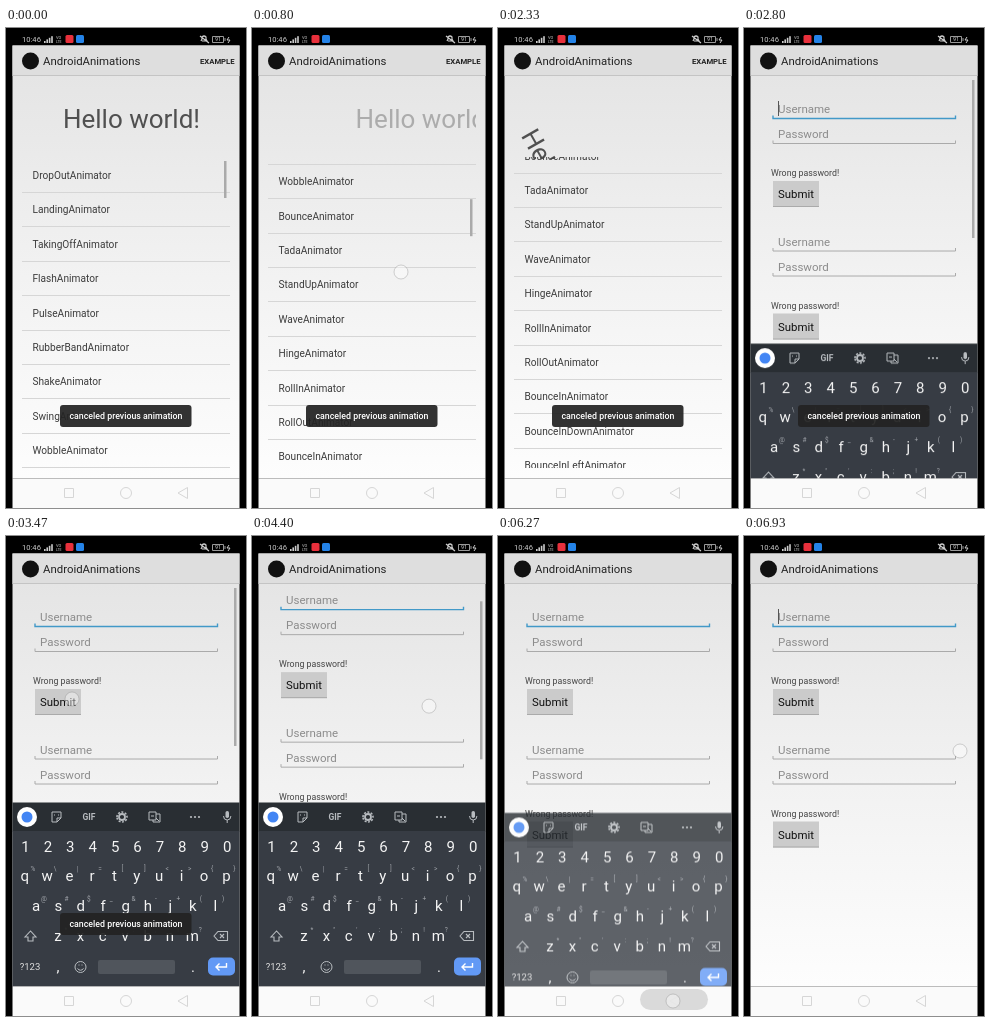
An HTML page with a canvas for the animation above (6990 ms loop, 240 by 480 pixels).

```html
<!DOCTYPE html>
<html lang="en">
<head>
<meta charset="utf-8">
<title>AndroidAnimations</title>
<style>
  html, body { margin: 0; width: 240px; height: 480px; overflow: hidden; background: #000; }
  canvas { display: block; }
</style>
</head>
<body>
<canvas id="stage" width="240" height="480"></canvas>
<script>
const screenCtx = document.getElementById('stage').getContext('2d');
let c = screenCtx;
const LOOP = 6990;
const animators = ('DropOut Landing TakingOff Flash Pulse RubberBand Shake Swing Wobble Bounce Tada ' +
  'StandUp Wave Hinge RollIn RollOut BounceIn BounceInDown BounceInLeft BounceInRight BounceInUp').split(' ');
// start, end, from x, from y, to x, to y
const touches = [
  [70, 260, 149, 380, 149, 240], [740, 810, 149, 244], [810, 1130, 149, 244, 149, 184],
  [1300, 1390, 149, 265], [2130, 2260, 212, 33], [3330, 3540, 66, 163],
  [4270, 4670, 177, 187, 177, 120], [4670, 4860, 177, 120], [5060, 5340, 66, 226],
  [6060, 6330, 175, 465], [6900, 6990, 216, 215]
];

const clamp = v => Math.max(0, Math.min(1, v));
const prog = (t, a, b) => clamp((t - a) / (b - a));
const easeOut = p => 1 - (1 - p) ** 3;
const smooth = p => p * p * (3 - 2 * p);

function keyed(frames, p) {
  const x = p * (frames.length - 1), i = Math.min(Math.floor(x), frames.length - 2);
  return frames[i] + (frames[i + 1] - frames[i]) * (x - i);
}
function rect(x, y, w, h, color) {
  c.fillStyle = color;
  c.fillRect(x, y, w, h);
}
function round(x, y, w, h, r, color) {
  c.fillStyle = color;
  c.beginPath();
  c.roundRect(x, y, w, h, r);
  c.fill();
}
function disc(x, y, r, color) {
  c.fillStyle = color;
  c.beginPath();
  c.arc(x, y, r, 0, 7);
  c.fill();
}
function line(path, color, width = 1) {
  c.strokeStyle = color;
  c.lineWidth = width;
  c.stroke(new Path2D(path));
}
// y is the visual middle of the line
function text(s, x, y, size, color, align = 'left', weight = 400) {
  c.font = `${weight} ${size}px Roboto, sans-serif`;
  c.textAlign = align;
  c.fillStyle = color;
  c.fillText(s, x, y + size * .36);
}
function clipped(x, y, w, h, draw) {
  c.save();
  c.beginPath();
  c.rect(x, y, w, h);
  c.clip();
  draw();
  c.restore();
}

function statusBar() {
  const ink = '#ccc';
  text('10:46', 16, 11.5, 7.6, ink);
  for (let i = 0; i < 4; i++) rect(38 + i * 2.4, 13 - i * 1.6, 1.6, 2 + i * 1.6, ink);
  text('VO', 50, 9.5, 4, ink);
  text('LTE', 50, 13.5, 3.6, ink);
  round(59.5, 7, 8, 8, 1.5, '#e8303c');
  round(70, 7, 8, 8, 1.5, '#2483e8');
  line('M196 13h5l-1-2v-2q-2-2-4 0v2l-1 2M194 8l9 7', ink, 1.2);
  line('M206.5 8.5h11v6h-11zM219 10v3', '#999');
  text('91', 212, 11.5, 5.5, ink, 'center');
  line('M223 9l-2 3h3l-2 3', ink);
}

function page(hasExample) {
  const g = c.createLinearGradient(0, 48, 0, 450);
  g.addColorStop(0, '#e5e5e5');
  g.addColorStop(.5, '#f2f2f2');
  g.addColorStop(1, '#fdfdfd');
  rect(6.5, 17.5, 227, 433, g);
  rect(6.5, 17.5, 227, 30, '#dedede');
  rect(6.5, 47, 227, 1, '#c4c4c4');
  disc(24.5, 33, 8.5, '#111');
  text('AndroidAnimations', 37, 33, 11.4, '#222');
  if (hasExample) text('EXAMPLE', 194, 33, 7.7, '#222', 'left', 700);
}

function hello(t) {
  c.save();
  if (t < 1375) {
    const shift = 46.5 * (t / 800) ** 2;
    c.globalAlpha = clamp(1 - shift / 77);
    c.translate(shift, 0);
  } else {
    const p = prog(t, 1375, 2575);
    c.globalAlpha = keyed([1, 1, 1, 1, 1, 0], p);
    c.translate(33, 74 + keyed([0, 0, 0, 0, 0, 700], p));
    c.rotate(keyed([0, 80, 60, 80, 60, 60], p) * Math.PI / 180);
    c.translate(-33, -74);
  }
  text('Hello world!', 125.5, 90.4, 26, '#505050', 'center');
  c.restore();
}

function listPage(t) {
  page(true);
  const scroll = 269 * easeOut(prog(t, 40, 740)) + 60 * smooth(prog(t, 810, 1130));
  clipped(16, 48, 208, 83, () => hello(t));
  clipped(16, 129, 208, 311, () => {
    animators.forEach((name, i) => {
      const y = 147.4 + i * 34.4 - scroll;
      text(name + 'Animator', 26.5, y, 10.15, '#3c3c3c');
      rect(16, Math.round(y + 16.6), 208, 1, '#d6d6d6');
    });
    c.globalAlpha = 1 - prog(t, 1130, 1400);
    rect(218, 133 + .142 * scroll, 2.5, 37, '#aaa');
  });
}

function field(label, y, color, width) {
  text(label, 34, y, 11.5, '#8c8c8c');
  line(`M29 ${y + 6.5}v3h182.5v-3`, color, width);
}

function form(t, y, start, focused) {
  const p = prog(t, start, start + 700);
  c.save();
  c.translate(120, y + 94);
  c.rotate(keyed([0, -3, -3, 3, -3, 3, -3, 3, -3, 0], p) * Math.PI / 180);
  const k = keyed([1, .9, .9, 1.1, 1.1, 1.1, 1.1, 1.1, 1.1, 1], p);
  c.scale(k, k);
  c.translate(-120, -94);
  if (focused) field('Username', 81, '#4299c8', 1.4);
  else field('Username', 81, '#aaa', 1);
  field('Password', 106, '#aaa', 1);
  if (focused && (t + 900) % 1000 >= 500) rect(34, 73, 1, 15, '#555');
  c.restore();
  text('Wrong password!', 27, y + 145, 8.8, '#444');
  rect(29, y + 153, 46, 26, '#cbcbcb');
  rect(29, y + 178, 46, 1, '#aaa');
  text('Submit', 52, y + 166, 11.4, '#111', 'center');
}

function examplePage(t) {
  page(false);
  const scroll = t < 6060 ? 67 * smooth(prog(t, 4270, 4670)) : 0;
  clipped(6, 48, 228, 402, () => {
    form(t, -scroll, 3550, true);
    form(t, 132.5 - scroll, 5235, false);
    if (t < 6060) rect(228, 52 + .79 * scroll, 2.5, 158, '#aaa');
  });
}

function keyRow(keys, hints, x, y) {
  [...keys].forEach((k, i) => {
    text(k, x + i * 22.4, y, 15, '#f4f4f4', 'center');
    if (hints) text(hints[i], x + 8 + i * 22.4, y - 6.5, 6.5, '#a0a4aa', 'center');
  });
}

function keyboard() {
  const ink = '#b8bcc0';
  rect(6.5, 266.5, 227, 29, '#292e33');
  rect(6.5, 295, 227, 155.5, '#373c44');
  disc(21, 281, 10, '#fff');
  disc(21, 281, 5.5, '#4285f4');
  line('M46 276h9v6l-4 4h-5zM55 282h-4v4M48 279h1M52 279h1', ink);
  text('GIF', 83, 281, 8.5, ink, 'center', 700);
  c.setLineDash([2, 1.5]);
  line('M111 281a5 5 0 0 1 10 0a5 5 0 0 1-10 0', ink, 1.6);
  c.setLineDash([]);
  line('M113 281a3 3 0 0 1 6 0a3 3 0 0 1-6 0', ink, 1.8);
  line('M143 276h7v8h-7zM150 278h4v8h-7v-2M145 280h3M150 282l3 3', ink);
  for (const x of [185, 189, 193]) disc(x, 281, 1.1, ink);
  round(219.5, 275, 3.5, 7, 1.7, ink);
  line('M217.5 280q0 4 3.7 4t3.7-4M221.2 284v3', ink);

  keyRow('1234567890', '', 19.5, 311);
  keyRow('qwertyuiop', '%\\|=[]<>{}', 18.8, 339.3);
  keyRow('asdfghjkl', '@#$_&-+()', 30, 369.5);
  keyRow('zxcvbnm', '*"\':;!?', 52, 400);
  line('M24.5 395l-5.5 6h3v4h5v-4h3z', ink, 1.1);
  line('M208 400l4-4.5h9.5v9h-9.5zM214 398l4 4M218 398l-4 4', ink, 1.1);
  text('?123', 24, 431, 9.5, '#e0e0e0', 'center');
  text(',', 52, 431, 15, '#f4f4f4', 'center');
  line('M69 431a5.5 5.5 0 0 1 11 0a5.5 5.5 0 0 1-11 0M71.5 432.5q3 3.5 6 0M72.5 429h1M75.5 429h1', ink);
  round(92, 424, 77, 14, 2, '#50555c');
  text('.', 187, 431, 15, '#f4f4f4', 'center');
  round(202, 421.5, 27, 18, 5, '#6299f5');
  line('M220.5 427v4h-10M213.5 427.5l-3.5 3.5l3.5 3.5', '#fff', 1.4);
}

// The keyboard fades as one layer
function keyboardLayer() {
  const layer = document.createElement('canvas');
  layer.width = 240;
  layer.height = 480;
  c = layer.getContext('2d');
  keyboard();
  c = screenCtx;
  return layer;
}
const keys = keyboardLayer();

function showKeyboard(t) {
  const out = prog(t, 6190, 6400);
  if (t < 2730 || out === 1) return;
  c.globalAlpha = clamp(1 - 1.35 * out * out);
  c.drawImage(keys, 0, 183 * (1 - easeOut(prog(t, 2730, 2930))) + 70 * out * out);
}

function toast(t) {
  c.globalAlpha = 1 - prog(t, 4030, 4250);
  round(54, 377, 131.5, 22, 3, 'rgba(35,35,35,.93)');
  text('canceled previous animation', 120, 388, 8.8, '#fff', 'center', 500);
  c.globalAlpha = 1;
}

function navBar(t) {
  rect(6.5, 450.5, 227, 30, '#fafafa');
  if (t >= 6060) {
    c.globalAlpha = 1 - prog(t, 6540, 6670);
    round(142, 453, 68, 21, 10.5, '#dadada');
    c.globalAlpha = 1;
  }
  line('M58.5 460.5h9v9h-9zM114.5 465a5.5 5.5 0 0 1 11 0a5.5 5.5 0 0 1-11 0M181.5 459.5v11l-9.5-5.5z', '#d6d6d6');
}

function showTouch(t) {
  for (const [a, b, x, y, x2 = x, y2 = y] of touches) {
    if (t < a || t >= b) continue;
    const p = smooth(prog(t, a, b)), cx = x + (x2 - x) * p, cy = y + (y2 - y) * p;
    disc(cx, cy, 7, 'rgba(255,255,255,.4)');
    c.strokeStyle = 'rgba(130,130,130,.35)';
    c.lineWidth = 1;
    c.stroke();
  }
}

function draw(t) {
  rect(0, 0, 240, 480, '#000');
  statusBar();
  const enter = easeOut(prog(t, 2450, 2800));
  if (enter < 1) listPage(t);
  if (enter > 0) {
    c.save();
    c.translate(234 * (1 - enter), 0);
    examplePage(t);
    c.restore();
  }
  clipped(6, 17, 228, 433.5, () => showKeyboard(t));
  toast(t);
  navBar(t);
  showTouch(t);
}

const begin = performance.now();
function tick() {
  draw((performance.now() - begin) % LOOP);
  requestAnimationFrame(tick);
}
tick();
</script>
</body>
</html>
```
